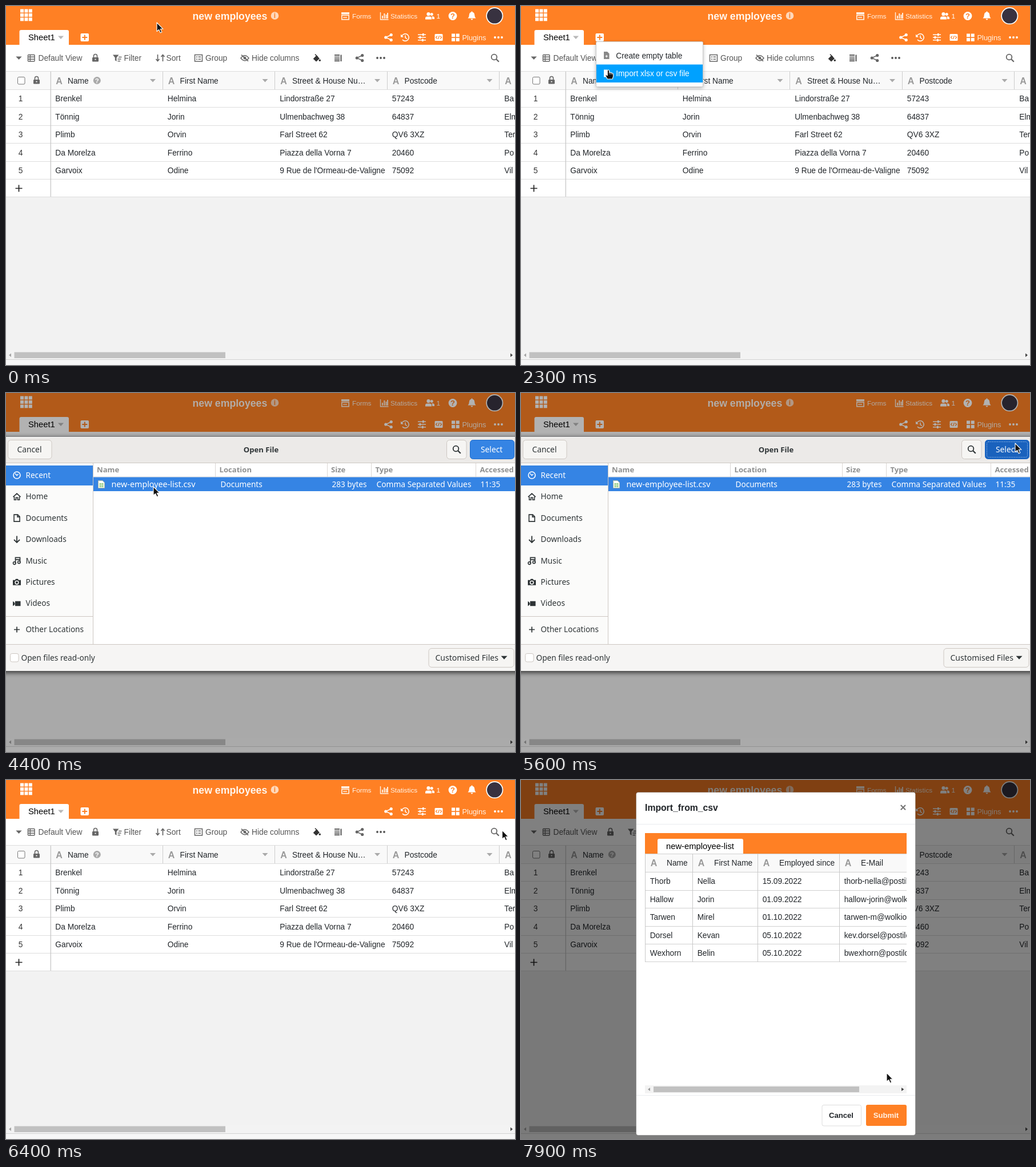
These frames come from a looping animation (891x629 px, 8 s). An HTML page:

```html
<!DOCTYPE html>
<html lang="en">
<head>
<meta charset="utf-8">
<title>Import a table</title>
<style>
  html, body { margin: 0; width: 100%; height: 100%; overflow: hidden; background: #f2f2f2; }
  svg { display: block; }
  text { font-family: "Liberation Sans", Arial, sans-serif; white-space: pre; }
  .ui text { font-family: "Noto Sans", "Open Sans", sans-serif; }
</style>
</head>
<body>
<svg id="stage" width="891" height="629" viewBox="0 0 891 629">
  <defs><clipPath id="sheetClip"><rect x="217" y="93" width="458" height="470"/></clipPath></defs>
  <g id="page"></g>
  <g id="menu"></g>
  <g id="dialog" class="ui"><g id="idle"></g><g id="active"></g></g>
  <g id="modal"></g>
  <g id="cursor"><g id="arrow"></g><g id="hand"></g></g>
</svg>
<script>
const $ = id => document.getElementById(id);
const ORANGE = '#ff8024', INK = '#212529', GREY = '#666', BLUE = '#3584e4';

const rect = (x, y, w, h, fill, more = '') =>
  `<rect x="${x}" y="${y}" width="${w}" height="${h}" fill="${fill}" ${more}/>`;
const text = (x, y, str, size = 13.76, fill = INK, more = '') =>
  `<text x="${x}" y="${y}" font-size="${size}" fill="${fill}" ${more}>${str.replace('&', '&amp;')}</text>`;
const bold = (x, y, str, size, fill, more = '') => text(x, y, str, size, fill, 'font-weight="700" ' + more);
const fillPath = (d, fill, more = '') => `<path d="${d}" fill="${fill}" ${more}/>`;
const line = (d, color, w = 1, more = '') => `<path d="${d}" fill="none" stroke="${color}" stroke-width="${w}" ${more}/>`;
const dot = (x, y, r, fill, more = '') => `<circle cx="${x}" cy="${y}" r="${r}" fill="${fill}" ${more}/>`;
const at = (x, y, body) => `<g transform="translate(${x},${y})">${body}</g>`;
const many = (list, fn) => list.map(fn).join('');
const caret = (x, y, fill, s = 5) => fillPath(`M${x - s} ${y - s / 2}h${2 * s}l${-s} ${s * 1.1}z`, fill);
const dots = (x, y, fill) => many([-6, 0, 6], d => dot(x + d, y, 1.9, fill));
const letter = (x, y) => bold(x, y, 'A', 16, '#999', 'text-anchor="middle"');

// Icons, each centred on its point
const share = (x, y, c) => at(x, y, line('M5 -4.5L-5 0L5 4.5', c, 1.5) +
  dot(-4.7, 0, 2.6, c) + dot(4.7, -4.5, 2.6, c) + dot(4.7, 4.5, 2.6, c));
const search = (x, y, c, w = 2) => at(x, y, dot(-1.5, -1.5, 4.8, 'none', `stroke="${c}" stroke-width="${w}"`) +
  line('M2 2L6.8 6.8', c, w + .4));
const lock = (x, y, c) => at(x, y, rect(-5.5, -1, 11, 7.5, c, 'rx="1.3"') +
  line('M-3 -1V-3.5A3 3 0 0 1 3 -3.5V-1', c, 1.6) + dot(0, 2.6, 1.1, '#fff'));
const sign = (x, y, r, ch, c, ink) => dot(x, y, r, c) +
  bold(x, y + r * .62, ch, r * 1.75, ink, 'text-anchor="middle"');

function headArt() {
  const W = '#fff', soft = '#fff3e8';
  let s = rect(0, 0, 891, 68, ORANGE);
  for (let i = 0; i < 9; i++) s += rect(25 + i % 3 * 7.4, 5.5 + (i / 3 | 0) * 7.4, 6, 6, W);
  s += bold(326.5, 23.5, 'new employees', 17.7, '#fff6ee') + sign(470.5, 17, 6.8, 'i', '#ffd8bb', ORANGE);
  // forms, statistics, people
  s += rect(587, 11, 14, 3.6, soft) + rect(587.8, 16.3, 12.4, 7.4, 'none', `stroke="${soft}" stroke-width="1.6"`) +
    line('M590 20h7', soft, 1.4) + text(606, 22, 'Forms', 11.8, soft);
  s += line('M655.5 11V23.7H669.5', soft, 1.4) + line('M659 22V17M662.3 22V13M665.5 22V15M668 22V12', soft, 1.9) +
    text(673, 22, 'Statistics', 11.8, soft);
  s += at(741, 17, dot(-1.5, -2.8, 3.1, W) + fillPath('M-7 6.5V4.5Q-7 1.5 -4 1.5H1Q4 1.5 4 4.5V6.5z', W) +
    dot(4.2, -2.4, 2.5, W) + fillPath('M5 6V4Q5 2 4 1.2H6Q9 1.2 9 4V6z', W)) + text(753.5, 22, '1', 11.8, W);
  s += sign(782, 17.5, 7.4, '?', W, ORANGE);
  s += at(815.5, 17, fillPath('M-7 4.5Q-4.7 2.5 -4.7 -1.5Q-4.5 -5.5 -1 -6.2V-7.4H1V-6.2Q4.5 -5.5 4.7 -1.5Q4.7 2.5 7 4.5z', W) +
    fillPath('M-2 5.5H2Q1.6 7.5 0 7.5T-2 5.5z', W));
  s += dot(855.3, 17.3, 15, W) + dot(855.3, 17.3, 13.3, '#383240');
  // tab row
  s += fillPath('M23.5 68V45Q23.5 42 26.5 42H107Q110 42 110 45V68z', W) + text(39, 60, 'Sheet1', 14.75, '#000') + caret(96, 55, '#b8b8b8');
  s += rect(130.5, 48, 14.5, 14, W, 'rx="2"') + line('M133.3 55H142.3M137.8 50.5V59.5', ORANGE, 2);
  s += share(669.5, 55, W);
  s += at(699, 55, line('M-5.8 -2.6A6.3 6.3 0 1 1 -5 4', W, 1.6) + fillPath('M-8 -5.5V-.5H-3z', W) + line('M0 -3.5V.6L3 2.4', W, 1.5));
  s += at(728, 55, line('M-7 -4.8H7M-7 0H7M-7 4.8H7', W, 1.6) + rect(1, -7, 2.6, 4.4, W) + rect(-4.4, -2.2, 2.6, 4.4, W) + rect(0, 2.6, 2.6, 4.4, W));
  s += rect(750.5, 49, 14, 12, W, 'rx="1.5"') + line('M755 52.3L752.5 55L755 57.7M760 52.3L762.5 55L760 57.7M758.4 52L756.6 58', ORANGE, 1.2);
  s += many([[780, 48.5], [787.7, 48.5], [780, 56], [787.7, 56]], p => rect(...p, 6, 5.8, W));
  return s + text(798.5, 59.5, 'Plugins', 12.8, soft) + dots(862, 55, W);
}

const people = [
  ['Brenkel', 'Helmina', 'Lindorstraße 27', '57243', 'Ba'],
  ['Tönnig', 'Jorin', 'Ulmenbachweg 38', '64837', 'Elm'],
  ['Plimb', 'Orvin', 'Farl Street 62', 'QV6 3XZ', 'Ter'],
  ['Da Morelza', 'Ferrino', 'Piazza della Vorna 7', '20460', 'Po'],
  ['Garvoix', 'Odine', "9 Rue de l'Ormeau-de-Valigne", '75092', 'Vil']
];

function pageArt() {
  let s = rect(0, 68, 891, 561, '#f2f2f2') + rect(0, 68, 891, 266.5, '#fff') + rect(0, 115, 891, 31, '#f9f9f9');
  s += `<g id="hover">${rect(832, 80, 50.5, 22, '#e6e6e6', 'rx="3"')}</g>`;
  // toolbar
  s += caret(22.5, 91, GREY, 5.2);
  s += rect(38.5, 85.5, 11.5, 11.5, 'none', `stroke="${GREY}" stroke-width="1.5" rx="1"`) + line('M38 89.3H50M38 93.2H50M42.3 86V97', GREY, 1.4);
  s += text(56.5, 96, 'Default View', 13.76, '#555') + lock(156.5, 91, GREY);
  s += fillPath('M187 85.5H197.5L193.5 90.5V97L190.8 95V90.5z', GREY) + line('M197 89.5H202.5M195.5 93H201.5M195.5 96.5H200', GREY, 1.5) + text(206.5, 96, 'Filter', 13.76, '#555');
  s += line('M265.5 85V96M262.5 93L265.5 96.5L268.5 93', GREY, 1.7) + line('M274.5 97V86M271.5 89L274.5 85.5L277.5 89', GREY, 1.7) + text(280.5, 96, 'Sort', 13.76, '#555');
  s += rect(330.5, 85.5, 13, 11.5, 'none', `stroke="${GREY}" stroke-width="1.5"`) + line('M333 89.2H335M336.5 89.2H341M333 93.2H335M336.5 93.2H341', GREY, 1.5) + text(349, 96, 'Group', 13.76, '#555');
  s += at(418, 91.2, line('M-7 0Q0 -9 7 0Q0 9 -7 0z', GREY, 1.5) + dot(0, 0, 2.4, GREY) + line('M-6 -5.5L6 5.5', GREY, 1.7)) + text(430, 96, 'Hide columns', 13.76, '#555');
  s += at(544, 91, fillPath('M-6.3 1.5L-.5 -4.5L5 1L-1 6.5z', '#333') + line('M-3 -6.5L2 -1.5', '#333', 1.5) + dot(5.3, 4.2, 1.7, '#333'));
  s += line('M575 86.2H584M575 89.5H584M575 92.8H584M575 96.2H584', '#444', 1.7) + line('M586.5 85.5V97', '#444', 1.8);
  s += share(619, 91, GREY) + dots(656, 91, '#555') + search(856, 91, GREY, 1.8);
  // column heads
  s += rect(20.5, 124.5, 12.5, 12.5, '#fff', 'rx="2" stroke="#777"') + lock(53.5, 130, GREY);
  s += many(['Name', 'First Name', 'Street & House Nu…', 'Postcode', ''], (h, i) => {
    const x = 78 + i * 196.5;
    return letter(x + 15, 136.5) + text(x + 30, 136, h) + caret(x + 179, 130.5, '#aaa') +
      (i ? line(`M${Math.round(x) - .5} 115V146`, '#ccc') : '');
  }) + sign(159.3, 130.5, 6.5, '?', '#aaa', '#fff');
  // rows
  s += many([114.5, 146.5, 177.5, 209.5, 240.5, 272.5, 303.5, 334.5], y => line(`M0 ${y}H891`, '#ddd'));
  s += many(people, (row, r) => {
    const y = 167 + r * 31.5;
    return text(25.5, y, '' + (r + 1), 13.76, '#333', 'text-anchor="middle"') +
      many(row, (v, c) => text(86.3 + c * 196.5, y, v));
  });
  s += line('M78.3 115V334', '#c4c4c4', 1.2) + line('M16.5 319.5H28.5M22.5 313.5V325.5', '#222', 1.7);
  s += rect(0, 605, 891, 14, '#f3f3f3') + rect(14.5, 606.5, 369.5, 10.5, '#c1c1c1') + line('M0 619.5H891', '#d2d2d2') + rect(0, 620, 891, 9, '#f7f7f7');
  return s + fillPath('M9 608.5V615L5 611.7z', '#a5a5a5') + fillPath('M883 608.5V615L887 611.7z', '#444');
}

function menuArt() {
  const item = (id, y, label) => `<g id="${id}">${rect(132, y - 15.5, 186, 31.5, '#00a1ff', 'class="hot"')}` +
    fillPath(`M145 ${y - 6.5}h6l3.5 3.5v9.5h-9.5z`, '#888', 'class="icon"') +
    line(`M147.5 ${y + 1.5}h4.5m-2.25 -2.25v4.5`, '#fff', 1.2) + text(166.3, y + 5, label) + '</g>';
  return rect(131.5, 62.5, 187, 79, '#fff', 'rx="2" stroke="#c8c8c8" style="filter:drop-shadow(0 2px 3px #0004)"') +
    item('item1', 86.5, 'Create empty table') + item('item2', 118, 'Import xlsx or csv file');
}

function dialogArt(on) {
  const ink = on ? '#2e3436' : '#929595', edge = on ? '#cdc7c2' : '#d8d4d0';
  const btn = (x, y, w, h, fill = on ? '#f6f5f3' : '#f5f4f2') => rect(x, y, w, h, fill, `rx="5" stroke="${edge}"`);
  let s = rect(-12, 77, 915, 410, '#f6f5f4', 'style="filter:drop-shadow(0 2px 4px #0007)"');
  s += rect(0, 77, 891, 46, on ? '#eceae8' : '#f6f5f4') + rect(0, 77, 891, 1, '#fff') + line('M0 122.5H891', edge);
  s += btn(3.5, 82.5, 76.5, 33) + text(19.5, 104, 'Cancel', 13.8, ink) + bold(446.5, 104, 'Open File', 13.1, ink, 'text-anchor="middle"');
  s += btn(771.5, 82.5, 34.5, 33) + search(789, 99, on ? '#2e3436' : '#777', 1.8);
  s += on ? `<g id="select">${rect(812.5, 82.5, 77, 33, BLUE, 'rx="5" stroke="#1b6acb"')}` +
    rect(815.5, 85.5, 71, 27, 'none', 'id="focus" rx="3" stroke="#8fbcf2" stroke-dasharray="1.5 1.5"') + '</g>' : btn(812.5, 82.5, 77, 33);
  s += text(831, 104, 'Select', 13.8, on ? '#fff' : '#c3c3c1');
  // places
  s += rect(0, 123, 152, 317, on ? '#fbfbfa' : '#fafaf9') + rect(153, 123, 738, 317, on ? '#fff' : '#fcfcfc') + line('M152.5 123V440', edge);
  s += rect(0, 127, 152, 35, BLUE) + dot(19, 144, 6, 'none', 'stroke="#fff" stroke-width="1.6"') + line('M16 141L19 144.5L21.5 142', '#fff', 1.4);
  s += many(['Recent', 'Home', 'Documents', 'Downloads', 'Music', 'Pictures', 'Videos'], (p, i) =>
    text(34.5, 149 + i * 37.4, p, 13.6, i ? ink : '#fff'));
  const glyphs = [
    line('M-6.5 .5L0 -5.5L6.5 .5M-4.5 0V5.5H-1.5V1.5H1.5V5.5H4.5V0', ink, 1.6),
    line('M-5 -6H1.5L5 -2.5V6H-5zM1 -6V-2H5', ink, 1.6),
    line('M0 -6V5M-5 .5L0 5.5L5 .5', ink, 1.8),
    line('M-2.5 4.5V-5.5H5.5V2.5M-2.5 -2H5.5', ink, 1.7) + dot(-4.2, 4.2, 2.3, 'none', `stroke="${ink}" stroke-width="1.6"`) + dot(3.8, 2.5, 2.2, 'none', `stroke="${ink}" stroke-width="1.6"`),
    fillPath('M-7 -3.5H-3L-2 -5.5H2L3 -3.5H7V5.5H-7z', ink) + dot(0, .8, 2.9, ink, 'stroke="#fff" stroke-width="1.5"'),
    rect(-3, -4, 9.5, 8.5, ink) + fillPath('M-7 -4L-3.5 -1V2L-7 4.5z', ink)
  ];
  s += many(glyphs, (g, i) => at(19, 181.7 + i * 37.4, g));
  s += line('M0 391.5H152', edge) + line('M14 414.5H24M19 409.5V419.5', ink, 1.7) + text(34.5, 419, 'Other Locations', 13.55, ink);
  // file list
  const cols = on ? '#8f9090' : '#c2c2c1';
  s += many([[159, 'Name'], [373.5, 'Location'], [569, 'Size'], [646.5, 'Type'], [829.5, 'Accessed']], c => bold(c[0], 139, c[1], 13.1, cols));
  if (on) s += line('M153 147H891M366.5 123V147M562.5 123V147M639.5 123V147M822.5 123V147', '#dad6d3') + rect(153, 147.5, 738, 24.5, BLUE);
  s += fillPath('M161.5 153.5H169L172.5 157V166.5H161.5z', '#fff', 'stroke="#a9b5a5"') + rect(163.5, 158, 7, 7, '#8cc97b') +
    line('M163.5 160.3H170.5M163.5 162.7H170.5M167 158V165', '#fff', .7);
  const cell = on ? '#fff' : '#2e3436';
  s += text(184.5, 165, 'new-employee-list.csv', 14.3, cell) + text(375.5, 165, 'Documents', 13.6, cell) + text(570.5, 165, '283 bytes', 13.6, cell) +
    text(648.5, 165, 'Comma Separated Values', 13.8, cell) + text(830.5, 165, '11:35', 13.6, cell);
  // footer
  s += line('M0 440.5H891', edge) + rect(7.5, 456.5, 14.5, 14.5, '#fff', `rx="3" stroke="${edge}"`) + text(26.5, 469, 'Open files read-only', 13.7, ink);
  return s + btn(740, 447.5, 149, 33) + text(751.5, 469, 'Customised Files', 14, ink) + caret(872, 463.5, ink, 5.5);
}

const imports = [
  ['Thorb', 'Nella', '15.09.2022', 'thorb-nella@postilo.example'],
  ['Hallow', 'Jorin', '01.09.2022', 'hallow-jorin@wolkio.example'],
  ['Tarwen', 'Mirel', '01.10.2022', 'tarwen-m@wolkio.example'],
  ['Dorsel', 'Kevan', '05.10.2022', 'kev.dorsel@postilo.example'],
  ['Wexhorn', 'Belin', '05.10.2022', 'bwexhorn@postilo.example']
];

function modalArt() {
  const xs = [217.5, 300.5, 414.5, 557.5];
  let s = rect(201.5, 21.5, 489, 601, '#fff', 'rx="4" stroke="#0003"');
  s += bold(217, 54, 'Import_from_csv', 15.75, INK) + line('M664.8 44L673 52.2M673 44L664.8 52.2', '#777', 2.2) + line('M202 77.5H690', '#e9ecef');
  s += rect(217, 93, 458, 36, ORANGE) + fillPath('M239 129V106Q239 103 242 103H386Q389 103 389 106V129z', '#fff') + text(254, 121, 'new-employee-list', 14.75, '#000');
  let t = rect(217, 129, 458, 32, '#f9f9f9');
  t += many([129.5, 161.5, 193.5, 224.5, 256.5, 287.5, 318.5], y => line(`M217 ${y}H675`, '#d0d0d0'));
  t += many(xs, x => line(`M${x} 129V319`, '#c8c8c8'));
  t += many(['Name', 'First Name', 'Employed since', 'E-Mail'], (h, i) =>
    letter(xs[i] + 15, 150.5) + text(xs[i] + 37.5, 150, h));
  t += many(imports, (row, r) => many(row, (v, c) => text(xs[c] + 8.2, 182 + r * 31.5, v)));
  s += `<g clip-path="url(#sheetClip)">${t}</g>`;
  s += rect(217, 535, 458, 14, '#f3f3f3') + rect(232, 537, 360, 10, '#c1c1c1') + fillPath('M226 539V545L222 542z', '#999') + fillPath('M666 539V545L670.5 542z', '#444');
  s += line('M202 552.5H690', '#e9ecef') + rect(527, 569.5, 68.5, 36.5, '#fff', 'rx="3" stroke="#ddd"') + rect(604, 569, 71, 37, ORANGE, 'rx="3"');
  return s + bold(560.5, 592, 'Cancel', 13.1, INK, 'text-anchor="middle"') + bold(639, 592, 'Submit', 13.1, '#fff1e5', 'text-anchor="middle"');
}

$('page').innerHTML = headArt() + pageArt();
$('menu').innerHTML = menuArt();
$('idle').innerHTML = dialogArt(false);
$('active').innerHTML = dialogArt(true);
$('modal').innerHTML = modalArt();
const outline = 'stroke="#fff" stroke-width="1.1" stroke-linejoin="round"';
$('arrow').innerHTML = fillPath('M0 0V15.5L3.6 12.3L6.2 18L8.8 16.8L6.3 11.3H11z', '#111', outline);
$('hand').innerHTML = fillPath('M-1.8 1Q0 -1 1.6 1V4.5Q3 3.6 4 5Q5.6 4.4 6.4 5.8Q8.6 5.6 8.5 7.8V11.5L7 16H-1.8L-5.3 9.8Q-5 7.6 -1.8 9.8z', '#111', outline) +
  line('M1.8 5V8M4.1 5.4V8.3M6.4 6.2V8.6', '#fff', .7);

// Linear value at time t along [time, ...values] steps
function track(t, keys) {
  let i = 1;
  while (i < keys.length - 1 && t > keys[i][0]) i++;
  const [a, b] = [keys[i - 1], keys[i]];
  const p = Math.min(1, Math.max(0, (t - a[0]) / (b[0] - a[0])));
  return a.slice(1).map((v, n) => v + (b[n + 1] - v) * p);
}

const path = [[200, 264, 29], [400, 241, 33], [700, 186, 47], [1000, 151, 53], [1200, 141, 53], [1700, 141, 54], [2000, 147, 84],
  [2300, 153, 112], [3000, 153, 112], [3300, 187, 132], [3600, 232, 153], [3800, 252, 163], [4000, 258, 164], [4500, 258, 164],
  [4800, 420, 150], [5100, 710, 112], [5400, 862, 89], [5600, 865, 88], [5900, 866, 88], [6500, 869, 88], [6800, 869, 88],
  [7100, 815, 146], [7500, 677, 308], [7700, 650, 430], [7900, 640, 513]];
const dims = [[3050, 1], [3550, .7], [5760, .7], [6010, 1], [6440, 1], [6590, .5]];
const opening = [[3050, 0], [3250, 1], [5750, 1], [5850, 0]];

const show = (id, on) => $(id).style.display = on ? '' : 'none';

function hot(id, on) {
  const g = $(id);
  g.querySelector('.hot').style.opacity = on ? 1 : 0;
  g.querySelector('.icon').setAttribute('fill', on ? '#fff' : '#888');
  g.querySelector('text').setAttribute('fill', on ? '#fff' : INK);
}

function draw(t) {
  const [x, y] = track(t, path);
  const [light] = track(t, dims), [scale] = track(t, opening);
  $('page').style.filter = light < 1 ? `brightness(${light})` : 'none';

  show('menu', t >= 1400 && t < 3000);
  hot('item1', y >= 71 && y < 102.5);
  hot('item2', y >= 102.5);

  show('dialog', scale > 0);
  $('dialog').setAttribute('transform', `translate(0,${282 * (1 - scale)}) scale(1,${scale || 1})`);
  $('active').style.opacity = track(t, [[4100, 0], [4400, 1]])[0];
  $('select').firstChild.setAttribute('fill', t >= 5500 ? '#1a62bd' : BLUE);
  show('focus', t >= 5500);

  const slide = Math.min(1, Math.max(0, (t - 6505) / 300));
  show('modal', slide > 0);
  $('modal').style.opacity = Math.min(1, slide * 2);
  $('modal').setAttribute('transform', `translate(0,${Math.round(-149 * (1 - slide) ** 1.73)})`);

  const pointing = t >= 1100 && t < 3000 || t >= 5800 && t < 6400;
  show('hover', t >= 5800 && t < 6400);
  show('hand', pointing);
  show('arrow', !pointing);
  $('cursor').setAttribute('transform', `translate(${x},${y})`);
}

function tick() {
  draw(Math.floor(performance.now() % 8000 / 100) * 100);
  requestAnimationFrame(tick);
}
tick();
</script>
</body>
</html>
```
